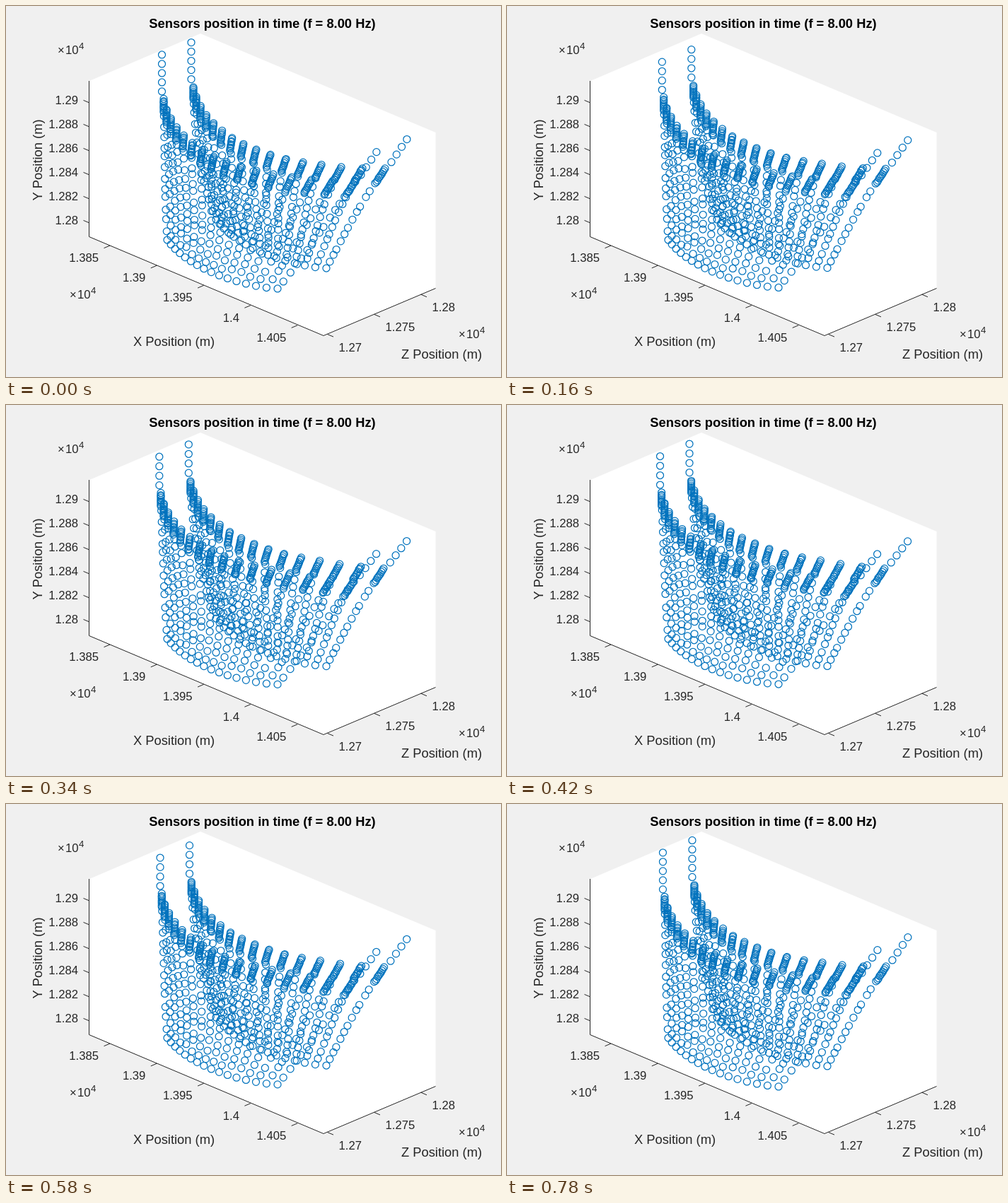
Recreate the animation shown at these times as an HTML page with a canvas. Size 700 px wide and 525 px high, loop 800 ms.

```html
<!DOCTYPE html>
<html lang="en">
<head>
<meta charset="utf-8">
<title>Sensors position in time</title>
<style>
  html, body { margin: 0; width: 100%; height: 100%; overflow: hidden; background: #f0f0f0; }
  canvas { display: block; }
</style>
</head>
<body>
<canvas id="stage" width="700" height="525"></canvas>
<script>
const ctx = document.getElementById('stage').getContext('2d');
const LOOP = 800, STEP = 20;
const INK = '#262626', BLUE = '#0072bd';
const STRINGS = 16, LINKS = 13;
const TICK_SIZE = 16.67, LABEL_SIZE = 18.33;

const mix = (a, b, s) => a + (b - a) * s;

let seed = 7;
function jitter(range) {
  seed = (seed * 16807) % 2147483647;
  return (seed / 2147483647 * 2 - 1) * range;
}

// Two mirrored walls of strings; the far one is shifted along the depth axis.
function buildSensors() {
  const sensors = [];
  for (const far of [0, 1]) {
    const add = (x, y, swayX, swayY, depth = 42, hideBelow = -2) => sensors.push({
      x: x + far * depth, y: y - far * depth * 0.42, swayX, swayY, hideBelow
    });

    for (let i = 0; i < STRINGS; i++) {
      const u = i / (STRINGS - 1);
      const rimX = 223 + 45 * u + 220 * u * u;
      const rimY = 257 - 116 * (1 - u) ** 1.9;
      const keelX = 228 + 72 * u + 84 * u * u;
      const keelY = 400 - 69 * (1 - u) ** 1.42;
      const bulge = 6.5 * Math.sin(2.6 * u ** 0.8) - 1;
      const swayX = 2.2 - 1.1 * u;
      const rimSway = 3.8 - 4.6 * u ** 5;
      const keelSway = (far ? 0.8 : 2.5) * u;

      for (let k = -1; k <= 1; k += 0.25)
        add(rimX - k * 6 * u ** 1.5, rimY + k * 9 + jitter(0.6), swayX, rimSway);

      for (let k = 1; k <= LINKS; k++) {
        const s = k === LINKS ? 1 : (k + jitter(0.2)) / LINKS;
        add(
          mix(rimX, keelX, s) + bulge * 6.75 * s * s * (1 - s),
          mix(rimY, keelY, s),
          swayX * (1 - s),
          mix(rimSway, keelSway, s),
          42 + 27 * s * s
        );
      }
    }

    // Loose ends above the rim; the highest one leaves the plot on the upswing.
    for (let k = 0; k < 5; k++) add(220.5, 69 + 13 * k, 2, 5 - k * 0.25, 41.5, k ? -2 : 0.5);
    for (let k = 0; k < 4; k++) add(502 + 7.3 * k, 239 - 10.8 * k, 0.9 - k * 0.25, -1 - k * 0.4, 43);
  }
  return sensors;
}

function line(x1, y1, x2, y2) {
  ctx.beginPath();
  ctx.moveTo(x1, y1);
  ctx.lineTo(x2, y2);
  ctx.stroke();
}

function label(text, x, y, align = 'center', size = LABEL_SIZE, weight = '') {
  ctx.font = `${weight} ${size}px "Liberation Sans", Arial, sans-serif`;
  ctx.textAlign = align;
  ctx.fillText(text, x, y);
}

function exponent(x, y) {
  label('×', x, y, 'left', TICK_SIZE);
  label('10', x + 11, y, 'left', TICK_SIZE);
  label('4', x + 30, y - 7, 'left', 13.3);
}

// side is -1 for labels left of the axis and 1 for labels right of it.
function ticks(count, first, step, x, y, dx, dy, side, slope, drop) {
  for (let i = 0; i < count; i++, x += dx, y += dy) {
    line(x, y, x + side * 8.5, y + slope);
    const text = String(+(first + i * step).toFixed(3));
    label(text, x + side * 16, y + drop, side < 0 ? 'right' : 'left', TICK_SIZE);
  }
}

function drawAxes() {
  ctx.fillStyle = '#f0f0f0';
  ctx.fillRect(0, 0, 700, 525);
  ctx.fillStyle = '#fff';
  ctx.beginPath();
  for (const p of [[118, 106], [275, 39], [607.5, 179], [607.5, 399], [449, 467], [118, 326]]) ctx.lineTo(...p);
  ctx.fill();

  ctx.strokeStyle = ctx.fillStyle = INK;
  ctx.lineWidth = 1;
  line(117.5, 106, 117.5, 326.5);
  line(117.5, 326.5, 449, 466.5);
  line(449, 466.5, 607.5, 399.5);
  ticks(6, 1.29, -0.002, 118, 137, 0, 34, -1, -3.6, 2);
  ticks(5, 1.385, 0.005, 147, 339, 66.3, 28.2, -1, 3.6, 23);
  ticks(3, 1.27, 0.005, 454.5, 464.5, 66, -28.2, 1, 3.6, 24);
  exponent(73, 68);
  exponent(90, 414);
  exponent(640, 470);

  label('X Position (m)', 237.5, 481);
  label('Z Position (m)', 616, 499);
  ctx.save();
  ctx.translate(51, 218);
  ctx.rotate(-Math.PI / 2);
  label('Y Position (m)', 0, 0);
  ctx.restore();
  ctx.fillStyle = '#000';
  label('Sensors position in time (f = 8.00 Hz)', 362.5, 31, 'center', LABEL_SIZE, 'bold');
}

function drawSensors(wave) {
  ctx.strokeStyle = BLUE;
  ctx.lineWidth = 1.25;
  for (const { x, y, swayX, swayY, hideBelow } of sensors) {
    if (wave < hideBelow) continue;
    ctx.beginPath();
    ctx.arc(x + swayX * (wave - 1), y + swayY * (wave - 1), 5, 0, 2 * Math.PI);
    ctx.stroke();
  }
}

const sensors = buildSensors();

function frame(now) {
  const t = Math.floor((now % LOOP) / STEP) * STEP;
  drawAxes();
  drawSensors(Math.cos(2 * Math.PI * (t - 12) / LOOP));
  requestAnimationFrame(frame);
}

frame(0);
</script>
</body>
</html>
```
